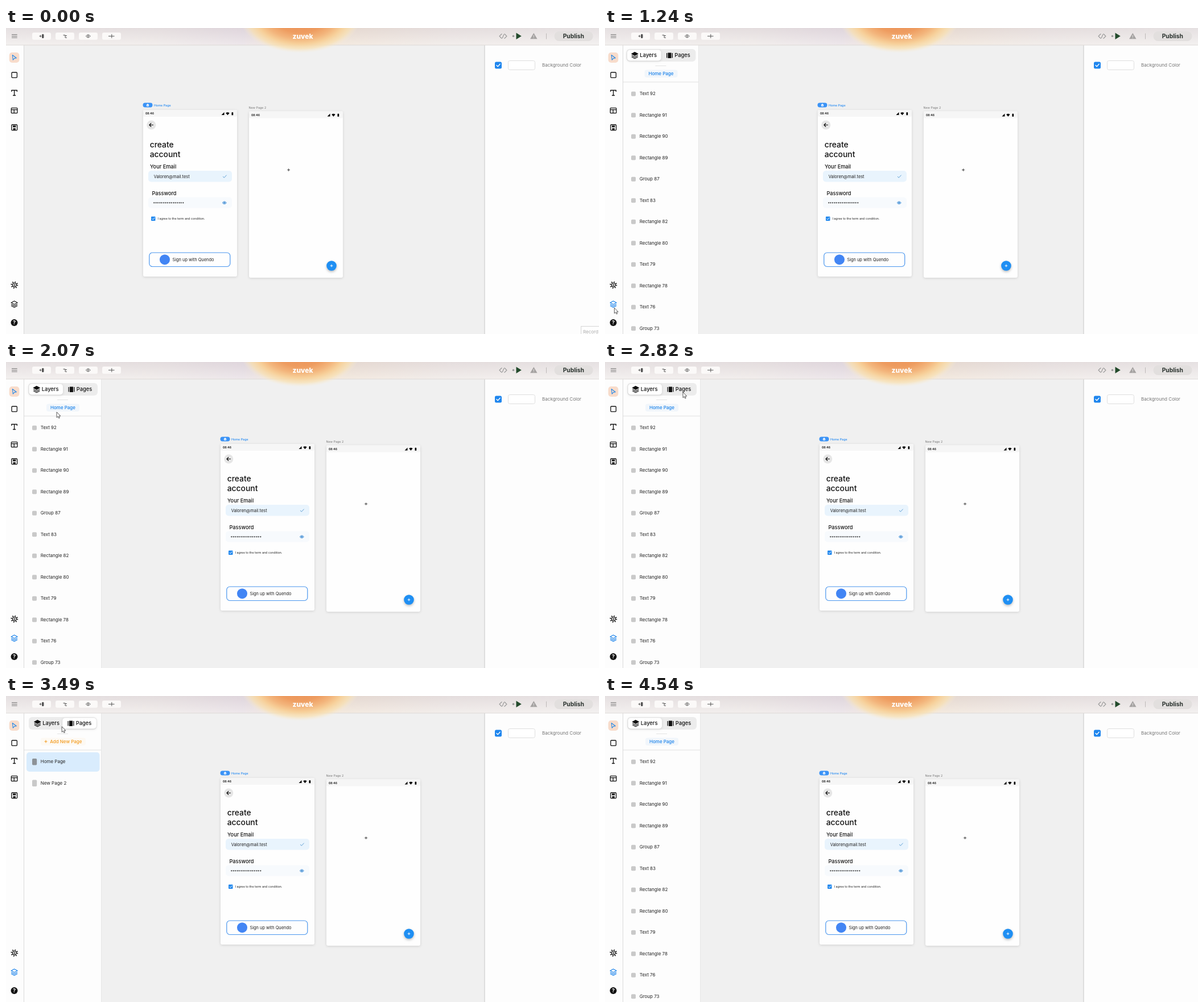
These frames come from a looping animation (1042x538 px, 4.88 s). An HTML page:

```html
<!DOCTYPE html>
<html lang="en">
<head>
<meta charset="utf-8">
<title>App builder</title>
<style>
  html, body { margin: 0; width: 100%; height: 100%; overflow: hidden; background: #f0f0f0; }
  svg { display: block; width: 100%; height: 100%; }
  text { font: 8px Inter, "Open Sans", sans-serif; fill: #222; }
  .mid { text-anchor: middle; }
  .tab { font-size: 9.3px; font-weight: 500; fill: #111; }
  .label { font-size: 9.2px; font-weight: 500; fill: #111; }
  .title { font-size: 13.9px; font-weight: 500; fill: #111; }
  .small { font-size: 5.4px; }
  .clock { font-size: 5px; font-weight: 700; }
  .field { font-size: 7.4px; }
  .line { fill: none; stroke: #111; stroke-width: 1.3; stroke-linejoin: round; stroke-linecap: round; }
  .thin { fill: none; stroke: #555; stroke-width: 1; }
  .soft { filter: drop-shadow(0 1px 2px #0002); }
</style>
</head>
<body>
<svg viewBox="0 0 1042 538" preserveAspectRatio="none">
  <defs>
    <linearGradient id="bar">
      <stop offset="0" stop-color="#f1eeee"/>
      <stop offset=".25" stop-color="#eee9e8"/>
      <stop offset=".4" stop-color="#e5dbe5"/>
      <stop offset=".5" stop-color="#f5dfc0"/>
      <stop offset=".6" stop-color="#f0e2d4"/>
      <stop offset=".75" stop-color="#efe9e7"/>
      <stop offset="1" stop-color="#f1efef"/>
    </linearGradient>
    <linearGradient id="barFade" x2="0" y2="1">
      <stop offset="0" stop-color="#d8cfd2" stop-opacity=".45"/>
      <stop offset="1" stop-color="#f6f3f1" stop-opacity=".5"/>
    </linearGradient>
    <radialGradient id="glow">
      <stop offset="0" stop-color="#ea8f58"/>
      <stop offset=".42" stop-color="#ee9c60"/>
      <stop offset=".6" stop-color="#f3b57c"/>
      <stop offset=".74" stop-color="#f7d09a"/>
      <stop offset=".88" stop-color="#f9e0b0" stop-opacity=".7"/>
      <stop offset="1" stop-color="#f8ecd4" stop-opacity="0"/>
    </radialGradient>
    <clipPath id="panelClip"><rect id="clipBox" x="31" y="30" width="0" height="508"/></clipPath>
    <g id="status">
      <rect width="165" height="12" rx="2" fill="#f6f6f6"/>
      <text class="clock" x="4" y="8">08:46</text>
      <path d="M137.500 9h5V4zM145.200 5.500q3.200-2.600 6.400 0L148.400 9.200zM155.500 4.600h.7v-.6h1.200v.6h.8v4.600h-2.700z"/>
    </g>
    <g id="stack" stroke-width="1.2" stroke-linejoin="round">
      <path d="M0-5.500 5.500-2.500 0 .5-5.500-2.500z"/>
      <path fill="none" d="M-5.500.2 0 3.200 5.500.2M-5.500 2.800 0 5.800 5.500 2.800"/>
    </g>
  </defs>

  <rect width="1042" height="538" fill="#f0f0f0"/>

  <g id="canvas">
    <rect x="240.500" y="131.500" width="17" height="8" rx="4" fill="#3b93f6"/>
    <path d="M246.300 135.500 249 133l2.700 2.500h-.8v2.300h-3.800v-2.300z" fill="#fff"/>
    <circle cx="249" cy="136.200" r=".7" fill="#3b93f6"/>
    <text class="small" x="260" y="137.800" style="fill:#2188f2;font-weight:500">Home Page</text>
    <text class="small" x="426.500" y="141.800" style="fill:#777">New Page 2</text>

    <rect class="soft" x="241" y="144" width="165" height="293" rx="3" fill="#fefefe"/>
    <use href="#status" x="241" y="144"/>
    <circle cx="255.300" cy="170.500" r="8" fill="#e6e6e6"/>
    <path class="line" style="stroke-width:1.100" d="M258.500 170.500h-6.400m2.800-3-3 3 3 3"/>
    <text class="title" x="252.700" y="209.500">create</text>
    <text class="title" x="252.700" y="226.500">account</text>
    <text class="label" x="253" y="246.700">Your Email</text>
    <rect x="250" y="251" width="147" height="19.500" rx="5" fill="#e9f4fd"/>
    <text class="field" x="259.700" y="263.500">Valoren@mail.test</text>
    <path class="line" style="stroke:#5e9fd4;stroke-width:1" d="m381.300 261.200 2 2 4-4.300"/>
    <text class="label" x="256.500" y="294.200">Password</text>
    <rect x="250" y="297.500" width="147" height="19" rx="5" fill="#f7fafd"/>
    <text x="258.500" y="310.500" style="font-size:6.300px;font-weight:600">****************</text>
    <path d="M380 307.300q3.800-5 7.600 0-3.800 5-7.600 0z" fill="#8dbce8" stroke="#5f9fdc" stroke-width=".7"/>
    <circle cx="383.800" cy="307.300" r="1.100" fill="#3c86cd"/>
    <rect x="255" y="331.500" width="7.500" height="7.500" rx="1" fill="#2188ee"/>
    <path class="line" style="stroke:#fff;stroke-width:1" d="m256.800 335.300 1.500 1.500 2.700-3"/>
    <text x="266.500" y="337.200" style="font-size:5.300px">I agree to the term and condition.</text>
    <rect x="251.800" y="395" width="142" height="24.500" rx="5.500" fill="#fefefe" stroke="#4a96ee" stroke-width="1.200"/>
    <circle cx="279" cy="407.200" r="9" fill="#4285f4"/>
    <text class="field" x="292.500" y="409.700">Sign up with Quendo</text>

    <rect class="soft" x="427" y="146.500" width="165" height="292.500" rx="3" fill="#fefefe"/>
    <use href="#status" x="427" y="146.500"/>
    <path d="M494.200 249.500h4.800m-2.400-2.400v4.800" stroke="#333" stroke-width=".9"/>
    <circle cx="572" cy="418" r="8.800" fill="#1f8ff3" style="filter:drop-shadow(0 2px 2px #0004)"/>
    <path d="M569.700 418h4.600m-2.300-2.300v4.600" stroke="#fff" stroke-width="1"/>
  </g>

  <g id="panel" clip-path="url(#panelClip)">
    <rect x="31" y="30" width="137" height="508" fill="#fdfdfd"/>
    <g id="layerList"></g>
    <g id="pageList">
      <rect x="36" y="99" width="128.500" height="34" rx="5" fill="#d9ecfd"/>
      <rect x="46" y="110" width="8.200" height="11.500" rx="1.800" fill="#8d9297"/>
      <text x="60.700" y="118.400">Home Page</text>
      <rect x="46" y="147.500" width="8.200" height="11.500" rx="1.800" fill="#c9c9c9"/>
      <text x="60.700" y="155.900">New Page 2</text>
    </g>
    <path d="M32 95h136" stroke="#e0e0e0"/>
    <g id="panelHead">
      <rect id="tabTrack" y="37" height="22" rx="6" fill="#ececec"/>
      <rect id="thumb" class="soft" y="38.500" width="59.500" height="19" rx="5" fill="#fff"/>
      <g id="layersTab">
        <use href="#stack" x="53.800" y="48" fill="#111" stroke="#111"/>
        <text class="tab" x="62.800" y="51.400">Layers</text>
      </g>
      <g id="pagesTab">
        <path d="M112 43.500h6v9.500h-6zM109.500 44h1.300v8.500h-1.300zM119.200 44h1.300v8.500h-1.300z" fill="#111"/>
        <text class="tab" x="123.800" y="51.400">Pages</text>
      </g>
      <path d="M90 66.500h19" stroke="#e3e3e3"/>
      <g id="layersHead">
        <rect x="71" y="73.500" width="58" height="13.500" rx="4" fill="#f1f6fb"/>
        <text class="mid" x="100" y="83" style="fill:#1780ea;font-weight:500">Home Page</text>
      </g>
      <g id="pagesHead">
        <rect x="61" y="73.500" width="79" height="13.500" rx="4" fill="#fdf9f3"/>
        <path d="M67.500 80h5m-2.500-2.500v5" stroke="#f39a1c"/>
        <text class="mid" x="105.300" y="83" style="fill:#f39a1c;font-weight:500">Add New Page</text>
      </g>
    </g>
  </g>
  <path id="panelEdge" d="M167.500 30v508" stroke="#e6e6e6"/>

  <rect x="0" y="30" width="31" height="508" fill="#fdfdfd"/>
  <path d="M31.500 30v508" stroke="#d9d9d9"/>
  <rect x="5.700" y="43" width="17.600" height="18" rx="5" fill="#f8dccb"/>
  <path class="line" style="stroke:#2589e8;stroke-width:1.100" d="m11.300 47.500 7 5.300-3.600.6-2.400 2.800z"/>
  <rect class="line" x="10" y="78" width="9.400" height="9.400" rx="1.300"/>
  <path class="line" d="M9.800 111.500v-2h9.600v2M14.600 109.500v9m-2 0h4"/>
  <path class="line" d="M10.300 140.700h8.600q1 0 1 1v7q0 1-1 1h-8.600q-1 0-1-1v-7q0-1 1-1zM9.500 143.700h10.200M14.200 143.700v6"/>
  <rect class="line" x="9.800" y="170" width="9.800" height="9.800" rx="1.300"/>
  <path d="M12 171.500h5.400v3H12zM12.500 176.300h4.400v3.300h-4.400z" fill="#111"/>
  <circle cx="14.800" cy="451.800" r="3.900" fill="none" stroke="#111" stroke-width="4.400" stroke-dasharray="1.100 1.962" style="stroke-width:5"/>
  <circle cx="14.800" cy="451.800" r="3.300" fill="#fdfdfd" stroke="#111" stroke-width="1.100"/>
  <path d="m15.500 449-2.600 3.200h1.600l-.6 2.500 2.700-3.300h-1.700z" fill="#111"/>
  <use id="layersIcon" href="#stack" x="14.600" y="485.500" fill="none"/>
  <circle cx="14.500" cy="518" r="6" fill="#111"/>
  <text class="mid" x="14.500" y="521.200" style="fill:#fff;font-size:9px;font-weight:700">?</text>

  <rect x="841" y="30" width="201" height="508" fill="#fdfdfd"/>
  <path d="M841 30v508" stroke="#d3d3d3" stroke-width="1.400"/>
  <rect x="859" y="59.500" width="12" height="12" rx="2.500" fill="#1f86ee"/>
  <path class="line" style="stroke:#fff" d="m862 65.500 2.200 2.300 4-4.600"/>
  <rect x="882.500" y="57.500" width="47" height="16" rx="3" fill="#fff" stroke="#dedede"/>
  <text x="942" y="68.400" style="fill:#777;font-size:8.100px">Background Color</text>

  <rect width="1042" height="30" fill="url(#bar)"/>
  <rect width="1042" height="30" fill="url(#barFade)"/>
  <path d="M0 30h1042" stroke="#ddd8d6"/>
  <ellipse cx="517" cy="-18" rx="106" ry="62" fill="url(#glow)"/>
  <text class="mid" x="521.500" y="19" style="fill:#fff;font-size:12px;font-weight:800">zuvek</text>
  <path d="M10 11.500h9.700M10 14.300h9.700M10 17h9.700" stroke="#777"/>
  <g id="buttons" fill="#fbf9f8"></g>
  <g class="thin">
    <path d="M58.500 14.300h4m-2-2v4"/>
    <path d="M63.500 11.300h2.500v6h-2.500z" fill="#555"/>
    <path d="M100.500 12.500h3.500v4.500h3M104 13.500h3"/>
    <path d="M140.500 14.300q3.800-5.200 7.600 0-3.800 5.200-7.600 0z"/>
    <circle cx="144.300" cy="14.300" r="1"/>
    <path d="M180 14.300h10.500M185.800 10.800v7"/>
  </g>
  <path class="line" style="stroke:#999;stroke-width:1.200" d="m871 10.500-4 3.900 4 3.900M876 10.500l4 3.900-4 3.900M874.800 11.500l-2.500 6"/>
  <circle cx="891.500" cy="14.300" r="1.800" fill="#999"/>
  <path d="M896.500 8.500v11.600l9.300-5.800z" fill="#234b2c"/>
  <path d="m927.300 8.800 6.200 10.500h-12.400z" fill="#a5a2a1"/>
  <path d="M927.300 12.700v3m0 1.100v1" stroke="#eee"/>
  <path d="M949.500 9.500v10" stroke="#bdb9b8"/>
  <rect x="963.500" y="5.800" width="68" height="17.200" rx="8.600" fill="#e2dfde"/>
  <text class="mid" x="997.300" y="18" style="fill:#2b332f;font-size:10.300px;font-weight:700">Publish</text>

  <g id="record">
    <rect x="1010.500" y="524.500" width="40" height="20" fill="#fff" stroke="#d5d5d5"/>
    <text x="1014" y="536.800" style="fill:#aaa">Record</text>
  </g>
  <path id="cursor" d="M0 0v9.700l2.200-1.900 1.600 3.200 1.500-.7-1.500-3.200h3z" fill="#fff" stroke="#333" stroke-width=".8" stroke-linejoin="round"/>
</svg>
<script>
const LOOP = 4880, TICK = 68.75, PANEL = 136;
const el = id => document.getElementById(id);
const clamp = u => Math.min(1, Math.max(0, u));
const lerp = (a, b, u) => a + (b - a) * u;
const easeOut = u => 1 - (1 - u) ** 3;
const smooth = u => u * u * (3 - 2 * u);
const span = (t, start, length) => clamp((t - start) / length);
const move = (id, x, y = 0) => el(id).setAttribute('transform', `translate(${x} ${y})`);
const show = (id, on) => el(id).style.display = on ? '' : 'none';

const layers = ['Text 92', 'Rectangle 91', 'Rectangle 90', 'Rectangle 89', 'Group 87', 'Text 83',
  'Rectangle 82', 'Rectangle 80', 'Text 79', 'Rectangle 78', 'Text 76', 'Group 73'];
el('layerList').innerHTML = layers.map((name, i) => {
  const y = 115.5 + 37.5 * i;
  return `<rect x="46" y="${y - 3.7}" width="8" height="8" rx="1.800" fill="#c9c9c9"/>
    <text x="60.700" y="${y + 2.9}">${name}</text>`;
}).join('');
el('buttons').innerHTML = [0, 1, 2, 3].map(i =>
  `<rect x="${46 + 41 * i}" y="8" width="33" height="12.800" rx="3"/>`).join('');

// time, x, y of the pointer tip
const path = [
  [65, 1030, 530], [210, 760, 450], [340, 420, 437], [480, 190, 452], [550, 131, 466],
  [690, 80, 478], [960, 10, 494], [1040, 10, 494], [1240, 16.5, 492], [1400, 20, 485],
  [1580, 31, 461], [1720, 75, 320], [1860, 104, 170], [2000, 94, 100], [2070, 88.5, 86.5],
  [2140, 92, 78.5], [2620, 131.5, 53], [2690, 131.5, 53], [2820, 137, 53], [3030, 137, 53],
  [3490, 99, 54], [3770, 84.5, 50], [4190, 84.5, 50], [4270, 190, 85], [4400, 638, 393], [4470, 732, 493]
];

function pointerAt(t) {
  const next = path.findIndex(key => key[0] > t);
  if (next < 1) return (next ? path[path.length - 1] : path[0]).slice(1);
  const [t0, x0, y0] = path[next - 1], [t1, x1, y1] = path[next];
  const u = (t - t0) / (t1 - t0);
  return [lerp(x0, x1, u), lerp(y0, y1, u)];
}

function draw(t) {
  const width = PANEL * easeOut(span(t, 1040, 275));
  move('canvas', width);
  el('clipBox').setAttribute('width', width && width + 1);
  move('panelHead', (width - PANEL) / 2);
  move('panelEdge', width - PANEL);
  show('panelEdge', width > 0);
  el('layersIcon').setAttribute('stroke', width > 0 ? '#1780ea' : '#111');

  const slide = smooth(span(t, 3020, 300)) - smooth(span(t, 3910, 300));
  move('layerList', -PANEL * slide);
  move('pageList', PANEL * (1 - slide));
  el('thumb').setAttribute('x', lerp(40.5, 99.3, slide));

  const onPages = t >= 3020 && t < 3910;
  show('pagesHead', onPages);
  show('layersHead', !onPages);
  move('layersTab', onPages ? 1.5 : 0);
  move('pagesTab', onPages ? -1 : 0);
  el('tabTrack').setAttribute('x', onPages ? 40 : 39);
  el('tabTrack').setAttribute('width', onPages ? 119.5 : 122);

  show('record', t < 65);
  show('cursor', t >= 65 && t < 4530);
  move('cursor', ...pointerAt(t));
}

function loop() {
  const t = performance.now() % LOOP;
  draw(Math.floor((t + 16) / TICK) * TICK);
  requestAnimationFrame(loop);
}
loop();
</script>
</body>
</html>
```
